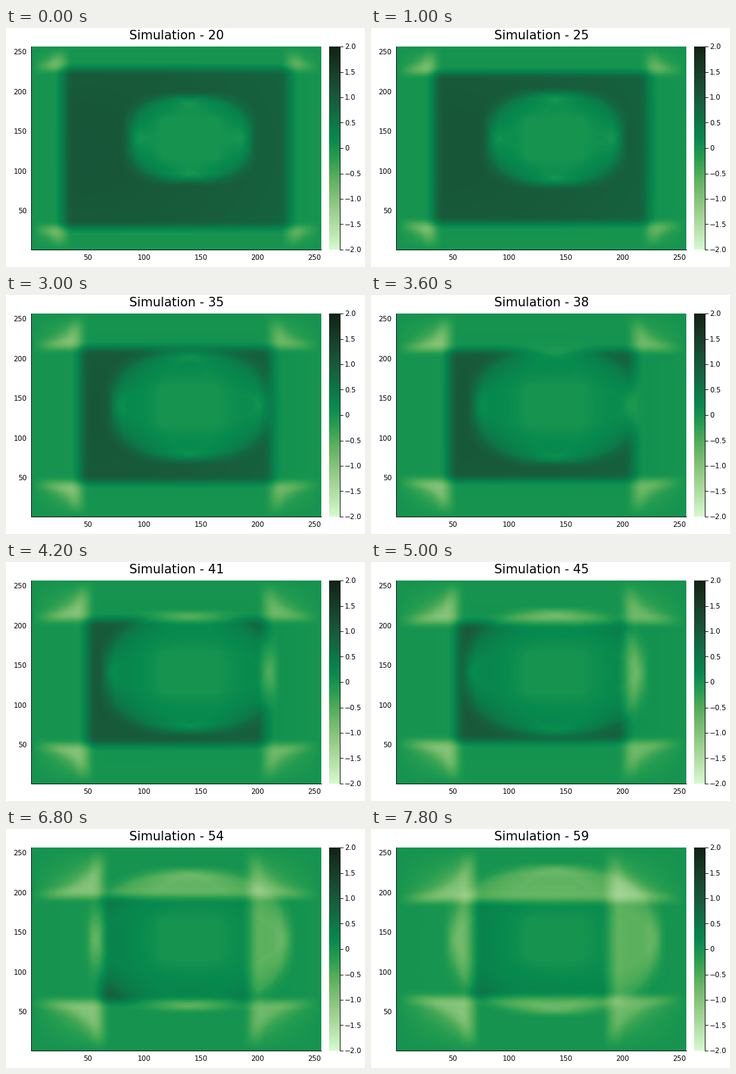
A matplotlib script for the animation above (8000 ms loop, 600 by 400 pixels).

```python
import numpy as np
import matplotlib.pyplot as plt
from matplotlib.animation import FuncAnimation
from matplotlib.colors import LinearSegmentedColormap
from matplotlib.patches import Rectangle

W, H, DPI = 600, 400, 100
N = 256
FIRST, COUNT = 20, 40
SUBSTEPS = 2          # solver steps per unit of time
LEAD = 8              # time already elapsed at step 0
BLOCK = (116, 165)    # extent of the fixed square, both axes
RAMP = 9              # width of the soft edges of the initial field

ALGAE = [(214, 249, 207), (186, 228, 174), (156, 209, 143), (124, 191, 115),
         (85, 174, 91), (37, 157, 81), (7, 138, 78), (13, 117, 71),
         (23, 95, 61), (25, 75, 49), (23, 55, 35), (17, 36, 20)]
cmap = LinearSegmentedColormap.from_list(
    "algae", [tuple(v / 255 for v in c) for c in ALGAE], N=256)


def soft(d):
    return np.sin(np.pi / 2 * np.clip(d / RAMP, 0, 1))


def initial_field():
    y, x = np.mgrid[1:N + 1, 1:N + 1].astype(float)
    rim_x = np.minimum(x, N + 1 - x) - 1
    rim_y = np.minimum(y, N + 1 - y) - 1
    mid, half = sum(BLOCK) / 2, (BLOCK[1] - BLOCK[0]) / 2
    gap_x = np.maximum(abs(x - mid) - half, 0)
    gap_y = np.maximum(abs(y - mid) - half, 0)
    gap = np.hypot(gap_x, gap_y)
    hill = 1.06 * np.exp(-((x - 40) ** 2 + (y - 128) ** 2) / 186000)
    free = (rim_x > 0) & (rim_y > 0) & (gap > 0)
    return hill * soft(rim_x) * soft(rim_y) * soft(gap) * free, free


def laplacian(u):
    out = np.zeros_like(u)
    out[1:-1, 1:-1] = (u[:-2, 1:-1] + u[2:, 1:-1] + u[1:-1, :-2]
                       + u[1:-1, 2:] - 4 * u[1:-1, 1:-1])
    return out


def simulate():
    """Leapfrog wave solver; returns one field per displayed step."""
    u, free = initial_field()
    k = 1 / SUBSTEPS ** 2
    prev = u + 0.5 * k * laplacian(u) * free
    fields = []
    for step in range(1, (FIRST + COUNT + LEAD) * SUBSTEPS):
        u, prev = (2 * u - prev + k * laplacian(u)) * free, u
        t, rest = divmod(step, SUBSTEPS)
        if rest == 0 and t >= FIRST + LEAD:
            fields.append(u)
    return fields


fields = simulate()

fig = plt.figure(figsize=(W / DPI, H / DPI), dpi=DPI, facecolor="white")
TICK, TITLE = 8.5, 15


def heatmap(x0, y0, x1, y1, data):
    ax = fig.add_axes([x0 / W, 1 - y1 / H, (x1 - x0) / W, (y1 - y0) / H])
    ax.axis("off")
    return ax.imshow(data, cmap=cmap, vmin=-2, vmax=2, origin="lower",
                     aspect="auto", interpolation="nearest")


def label(x, y, s, size=TICK, **kw):
    return fig.text(x / W, 1 - y / H, s, fontsize=size, color="black",
                    family="DejaVu Sans", va="baseline", **kw)


def bar(x, y, w, h):
    """Black pixel-aligned strip with its top left corner at x, y."""
    fig.add_artist(Rectangle((x / W, 1 - (y + h) / H), w / W, h / H,
                             transform=fig.transFigure, color="black", lw=0))


L, T, R, B = 42, 31, 527, 371
image = heatmap(L, T, R, B, fields[0])
heatmap(540, T, 558, B, np.linspace(-2, 2, 256)[:, None])

bar(L, B, R - L + 1, 1)
bar(L, T, 1, B - T)
bar(558, T, 1, B - T + 1)

for v in range(50, 251, 50):
    f = (v - 0.5) / N
    label(L + 0.3 + f * (R - L + 0.5), 387.5, str(v), ha="center")
    label(34.5, B - f * (B - T) + 4.8, str(v), ha="right")

for i in range(9):
    v = i / 2 - 2
    y = B - i / 8 * (B - T)
    bar(558, round(y), 6, 1)
    text = f"{v:.1f}".replace("-", "\u2212") if v else "0"
    label(565.8, y + 4.3, text, ha="left")

title = label(285.5, 18.8, "", TITLE, ha="center")


def draw(i):
    image.set_data(fields[i])
    title.set_text(f"Simulation - {FIRST + i}")
    return image, title


anim = FuncAnimation(fig, draw, frames=COUNT, interval=200, repeat=True,
                     repeat_delay=0, blit=False)
plt.show()
```
